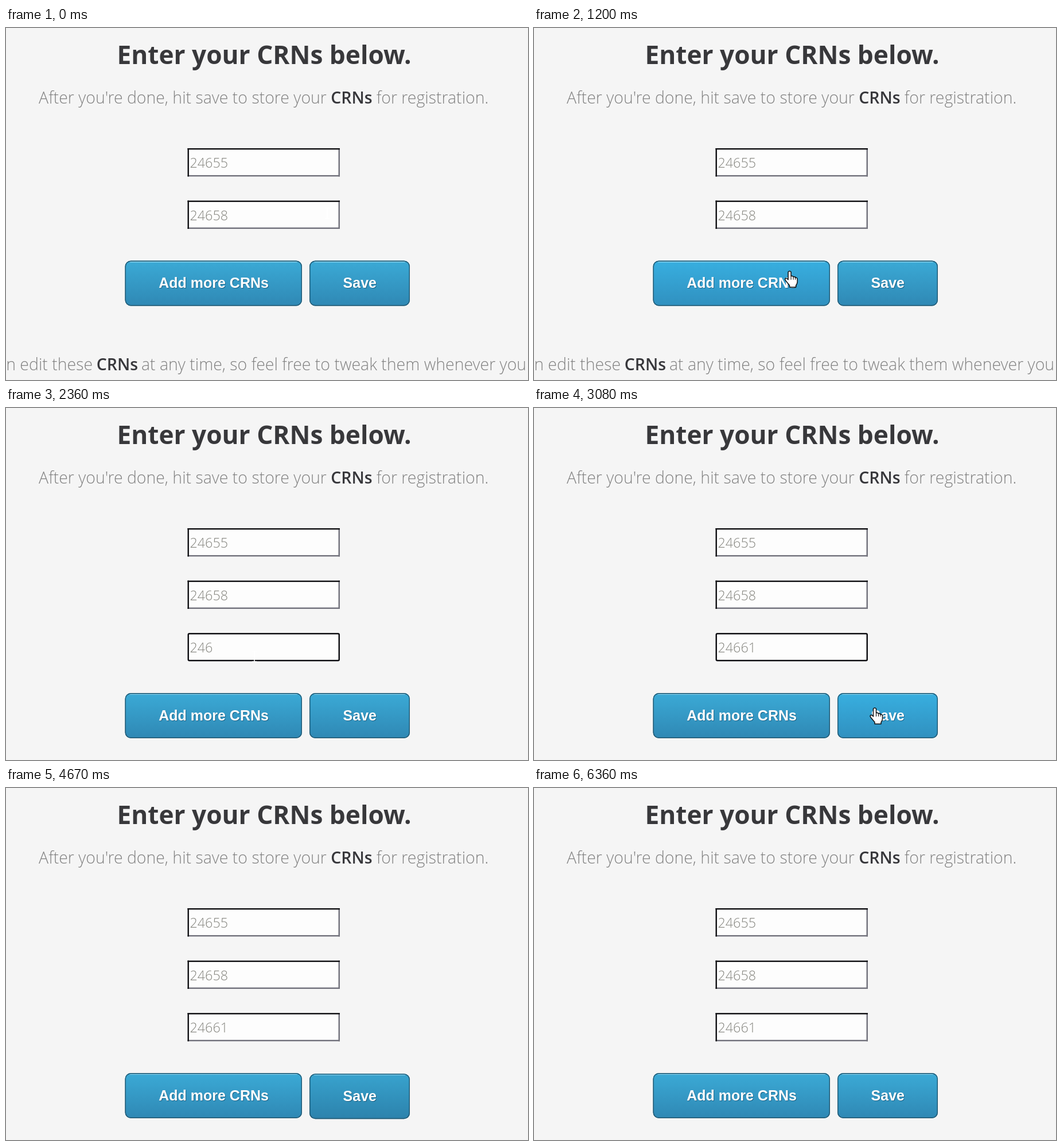
These frames come from a looping animation (910x615 px, 6.41 s). An HTML page with a canvas:

```html
<!DOCTYPE html>
<html lang="en">
<head>
<meta charset="utf-8">
<title>Enter your CRNs</title>
<style>
html, body { margin: 0; width: 100%; height: 100%; overflow: hidden; background: #f5f5f5; }
canvas { display: block; width: 910px; height: 615px; }
</style>
</head>
<body>
<canvas id="stage" width="910" height="615"></canvas>
<script>
const ctx = document.getElementById('stage').getContext('2d');
const LOOP = 6410;
const SANS = '"Open Sans", "Noto Sans", sans-serif';
const ARIAL = '"Liberation Sans", Arial, sans-serif';
const ADD_AT = 1530, FOCUS_AT = 1900, TYPE_AT = 2060, KEY_MS = 120;
const PRESS_AT = 3740, RELEASE_AT = 5400;
const ROW = 91.5, FIELD_X = 316.5, FIELD_Y = 210, FIELD_W = 265.5, FIELD_H = 49.5;
const BTN_H = 79;

// pointer path: time, x, y
const path = [
  [0, 560, 324], [670, 546, 343.5], [1340, 433, 435], [2640, 433, 434.5],
  [3050, 594, 524], [3200, 594, 524], [3680, 614, 541],
  [4080, 614, 541], [4520, 770, 660]
];

function pointerAt(t) {
  const i = path.findIndex(p => p[0] > t);
  if (i < 0) return path[path.length - 1].slice(1);
  const [t0, x0, y0] = path[i - 1], [t1, x1, y1] = path[i];
  const u = (t - t0) / (t1 - t0), e = u * u * (3 - 2 * u);
  return [x0 + (x1 - x0) * e, y0 + (y1 - y0) * e];
}

function text(str, x, y, font, color, align = 'center') {
  ctx.font = font;
  ctx.textAlign = align;
  ctx.fillStyle = color;
  ctx.fillText(str, x, y);
}

const light = (str, x, y, align) => text(str, x, y, `300 28.45px ${SANS}`, '#828282', align);
const strong = (x, y) => text('CRNs', x, y, `600 28.45px ${SANS}`, '#37373b');

function field(y, value, focused) {
  const x = FIELD_X, w = FIELD_W, h = FIELD_H;
  ctx.fillStyle = '#fdfdfd';
  ctx.fillRect(x, y, w, h);
  if (focused) {
    ctx.strokeStyle = '#101014';
    ctx.lineWidth = 2.5;
    ctx.beginPath();
    ctx.roundRect(x + 1.25, y + 1.25, w - 2.5, h - 2.5, 2);
    ctx.stroke();
  } else {
    ctx.fillStyle = '#74747e';
    ctx.fillRect(x, y + h - 2.5, w, 2.5);
    ctx.fillRect(x + w - 2.5, y, 2.5, h);
    ctx.fillStyle = '#151518';
    ctx.fillRect(x, y, w, 2.5);
    ctx.fillRect(x, y, 2.5, h);
  }
  text(value, 320.5, y + 34, `300 23.3px ${SANS}`, '#85857f', 'left');
}

const tones = {
  normal: ['#3baad6', '#2f88b4'],
  hover: ['#38afe0', '#3090bf'],
  down: ['#38a3ce', '#2c82ac']
};

function button(label, x, y, w, state) {
  const h = BTN_H;
  if (state === 'down') y += 1.2;
  const g = ctx.createLinearGradient(0, y, 0, y + h);
  tones[state].forEach((c, i) => g.addColorStop(i, c));
  ctx.fillStyle = g;
  ctx.beginPath();
  ctx.roundRect(x, y, w, h, 10);
  ctx.fill();
  ctx.strokeStyle = 'rgba(150,214,238,.8)';
  ctx.lineWidth = 1.4;
  ctx.beginPath();
  ctx.moveTo(x + 8, y + 2.2);
  ctx.lineTo(x + w - 8, y + 2.2);
  ctx.stroke();
  ctx.strokeStyle = '#20566f';
  ctx.beginPath();
  ctx.roundRect(x + .7, y + .7, w - 1.4, h - 1.4, 9.5);
  ctx.stroke();
  const cx = x + w / 2 + .3, base = y + 47.5;
  text(label, cx + 1, base + 1, `bold 25px ${ARIAL}`, 'rgba(10,50,75,.5)');
  text(label, cx, base, `bold 25px ${ARIAL}`, '#fff');
}

function shape(x, y, d) {
  ctx.save();
  ctx.translate(x, y);
  const p = new Path2D(d);
  ctx.fillStyle = '#fff';
  ctx.strokeStyle = '#111';
  ctx.lineWidth = 1.5;
  ctx.lineJoin = 'round';
  ctx.fill(p);
  ctx.stroke(p);
  ctx.restore();
}

function hand(x, y) {
  shape(x, y, 'M-2.5 1.5Q0-1.5 2.5 1.5V9Q5 7.5 6.5 10Q9 9 10 11.5Q13 10.5 13.5 14V19Q13 23 11 25V28H0V25L-7 16.5Q-9 13.5-6.5 12.5Q-4.5 12-2.5 15Z');
  ctx.strokeStyle = '#111';
  ctx.lineWidth = 1.1;
  ctx.beginPath();
  for (const dx of [2.5, 6.5, 10]) {
    ctx.moveTo(x + dx, y + 9.5);
    ctx.lineTo(x + dx, y + 15);
  }
  ctx.stroke();
}

const arrow = (x, y) => shape(x, y, 'M0 0V20L4.6 15.8L8 23.5L11.5 22L8.2 14.5H14.5Z');

function beam(x, y) {
  ctx.fillStyle = '#fff';
  ctx.fillRect(x - .75, y - 9, 1.5, 18);
  ctx.fillRect(x - 4, y - 10, 8, 1.3);
  ctx.fillRect(x - 4, y + 8, 8, 1.3);
}

function draw(t) {
  const added = t >= ADD_AT;
  const top = 406.5 + (added ? ROW : 0);
  const [px, py] = pointerAt(t);
  const inside = (x, y, w, h) => px >= x && px <= x + w && py >= y && py <= y + h;

  ctx.fillStyle = '#f5f5f5';
  ctx.fillRect(0, 0, 910, 615);
  text('Enter your CRNs below.', 450, 63, `700 44.2px ${SANS}`, '#38383b');
  light("After you're done, hit save to store your", 308, 132);
  strong(602.5, 132);
  light('for registration.', 743.5, 132);

  const fields = ['24655', '24658'];
  if (added) {
    const n = Math.floor((t - TYPE_AT) / KEY_MS) + 1;
    fields.push('24661'.slice(0, Math.max(0, n)));
  }
  fields.forEach((v, i) =>
    field(FIELD_Y + i * ROW, v, i === 2 && t >= FOCUS_AT && t < PRESS_AT));

  const overAdd = inside(207.5, top, 308.5, BTN_H);
  const overSave = inside(529, top, 175, BTN_H);
  const addDown = t >= 1420 && !added;
  const saveDown = t >= PRESS_AT && t < RELEASE_AT;
  button('Add more CRNs', 207.5, top, 308.5, addDown ? 'down' : overAdd ? 'hover' : 'normal');
  button('Save', 529, top, 175, saveDown ? 'down' : overSave ? 'hover' : 'normal');

  if (!added) {
    light('You can edit these', 151, 598, 'right');
    strong(194, 598);
    light('at any time, so feel free to tweak them whenever you', 571.5, 598);
  }

  if (overAdd || overSave) hand(px, py);
  else if (fields.some((v, i) => inside(FIELD_X, FIELD_Y + i * ROW, FIELD_W, FIELD_H))) beam(px, py);
  else arrow(px, py);
}

const start = performance.now();
function tick() {
  draw((performance.now() - start) % LOOP);
  requestAnimationFrame(tick);
}
tick();
</script>
</body>
</html>
```
